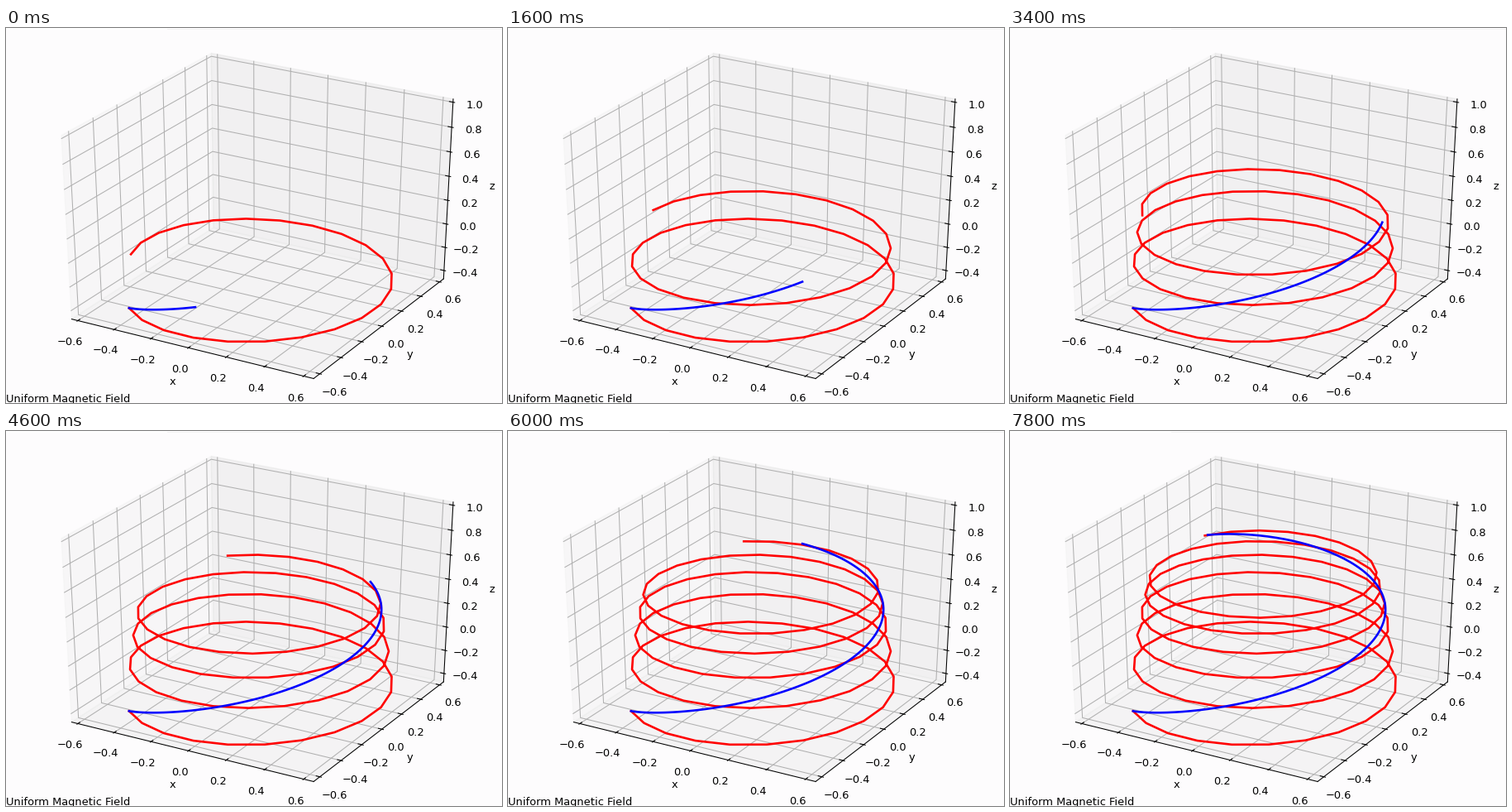
Animation of 600 by 453 pixels, one loop 8 s. Source, as a matplotlib script:

```python
import numpy as np
import matplotlib.pyplot as plt
from matplotlib.animation import FuncAnimation

W, H, DPI = 600, 453, 96
PT = 93.75 / DPI               # size of one drawn point
FRAMES, STEP_MS = 40, 200
PAPER = "#fdfcfd"

plt.rcParams["font.family"] = "DejaVu Sans"
fig = plt.figure(figsize=(W / DPI, H / DPI), dpi=DPI, facecolor=PAPER)
ax = fig.add_axes([0, 0, 1, 1])
ax.set_xlim(0, W)
ax.set_ylim(H, 0)
ax.axis("off")

# Perspective camera looking at a unit cube
ELEV, AZIM, DIST = np.radians(30), np.radians(-60), 10
EYE = np.array([np.cos(ELEV) * np.cos(AZIM),
                np.cos(ELEV) * np.sin(AZIM), np.sin(ELEV)])
RIGHT = np.array([-np.sin(AZIM), np.cos(AZIM), 0])
UP = np.cross(EYE, RIGHT)
CENTER = 308, 220
SCALE = 600 / 0.185, 450 / 0.185


def project(points):
    p = np.asarray(points, float)
    depth = DIST - p @ EYE
    return (CENTER[0] + SCALE[0] * (p @ RIGHT) / depth,
            CENTER[1] - SCALE[1] * (p @ UP) / depth)


# Damped helices: same radius and height, different turning rates
PER_TURN = 23.45


def helix(rate):
    t = np.arange(137) / PER_TURN
    angle = np.radians(225 + 360 * rate * t)
    r = 0.635 * np.exp(-0.0386 * t)
    z = 1.005 - 1.448 * np.exp(-0.235 * t)
    return np.column_stack([r * np.cos(angle), r * np.sin(angle), z])


red, blue = helix(1), helix(0.137)
low, high = red.min(axis=0), red.max(axis=0)
high[2] = 0.995
MID, SPAN = (low + high) / 2, high - low


def stroke(points, color, width, order, cap="projecting"):
    ax.plot(*project(points), color=color, lw=width * PT, zorder=order,
            solid_capstyle=cap)


def label(point, text, va):
    x, y = project(point)
    ax.text(x, y, text, size=10 * PT, ha="center", va=va, zorder=5)


B = 0.5 + 1 / 48               # half side of the drawn box
TICK_PAD, NAME_PAD = 0.060, 0.124

# Panes
panes = [
    (0.95, [(-B, -B, -B), (-B, B, -B), (-B, B, B), (-B, -B, B)]),
    (0.90, [(-B, B, -B), (B, B, -B), (B, B, B), (-B, B, B)]),
    (0.925, [(-B, -B, -B), (B, -B, -B), (B, B, -B), (-B, B, -B)]),
]
for gray, corners in panes:
    shade = (gray, gray, gray, 0.5)
    ax.fill(*project(corners), facecolor=shade, edgecolor=shade,
            lw=PT, zorder=1)

# name, edge signs, grid turning points, tick direction, ticks
axes3d = [
    ("x", (0, -1, -1), [(0, 1, -1), (0, 1, 1)], (0, -1, 0),
     np.arange(-3, 4) / 5),
    ("y", (1, 0, -1), [(-1, 0, -1), (-1, 0, 1)], (1, 0, 0),
     np.arange(-3, 4) / 5),
    ("z", (1, 1, 0), [(-1, 1, 0), (-1, -1, 0)], (1, 0, 0),
     np.arange(-2, 6) / 5),
]
for i, (name, edge, far, out, ticks) in enumerate(axes3d):
    edge, out = np.array(edge, float), np.array(out, float)
    unit = np.eye(3)[i]
    stroke([edge * B - unit * B, edge * B + unit * B], "black", 0.8, 3)
    for value in ticks:
        at = unit * (value - MID[i]) / SPAN[i]
        foot = edge * B + at
        stroke([foot] + [np.array(f) * B + at for f in far],
               "#b0b0b0", 0.8, 2)
        stroke([foot + out * 0.1 / 12, foot - out * 0.2 / 12],
               "black", 0.8, 3, "butt")
        label(edge * (B + TICK_PAD) + at,
              f"{value:.1f}".replace("-", "\u2212"), "top")
    label(edge * (B + NAME_PAD), name, "center")

ax.text(0.2, 451.9, "Uniform Magnetic Field", size=10 * PT, va="baseline")
ax.plot([0, 195], [0.5, 0.5], color="white", lw=1)
ax.plot([195, W], [0.5, 0.5], color="#f4f4f4", lw=0.75)

paths = [project((curve - MID) / SPAN) for curve in (red, blue)]
lines = [ax.plot([], [], color=c, lw=2 * PT, zorder=6 + k)[0]
         for k, c in enumerate(("red", "blue"))]

# The drawing speed is uneven: points reached at a few frames
KEYS = [0, 8, 12, 17, 23, 27, 34, 39]
REACHED = [22, 44, 60, 70, 88, 105, 118, 136]


def update(frame):
    n = int(round(np.interp(frame, KEYS, REACHED))) + 1
    for line, (x, y) in zip(lines, paths):
        line.set_data(x[:n], y[:n])
    return lines


anim = FuncAnimation(fig, update, frames=FRAMES, interval=STEP_MS,
                     init_func=lambda: update(0), repeat=True, repeat_delay=0)
plt.show()
```
